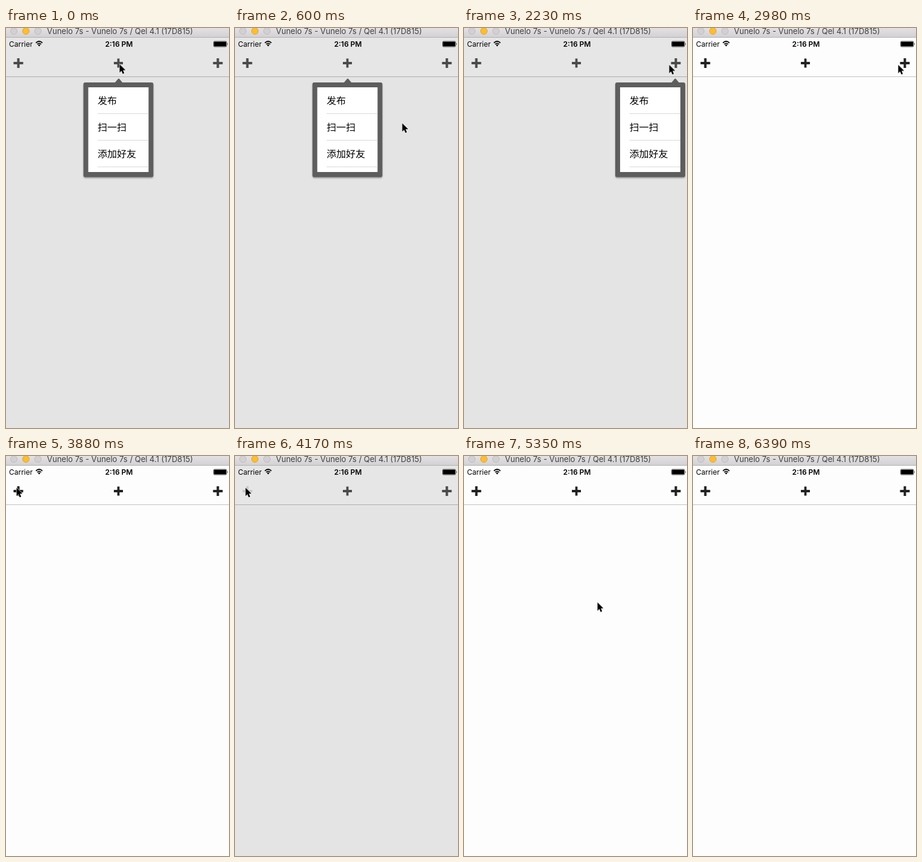
Animation of 370x661 px, one loop 6.99 s. Source, as an HTML page:

```html
<!DOCTYPE html>
<html lang="zh-Hans">
<head>
<meta charset="utf-8">
<title>Popover menu</title>
<style>
html, body { margin: 0; width: 100%; height: 100%; overflow: hidden; background: #fdfdfd; }
svg { display: block; width: 370px; height: 661px; }
text { font-family: Inter, Roboto, sans-serif; }
.menu text { font: 17px "Noto Sans CJK SC", "Noto Sans CJK", sans-serif; }
.anim, .plus { animation: 6990ms step-end infinite; }

.screen { animation-name: dim; }
.plus { animation-name: fade; }
.press-left { animation-name: press-left; }
.press-right { animation-name: press-right; }
.mid { animation-name: show-mid; }
.right { animation-name: show-right; }
.left { animation-name: show-left; }
.cursor { animation-name: move; }

@keyframes dim {
  0%, 25.6%, 59.65% { fill: #e4e4e4; }
  12.73%, 42.63%, 76.53%, 100% { fill: #fdfdfd; }
}
@keyframes fade {
  0%, 25.6%, 59.65% { fill: #4b4b4b; }
  12.73%, 42.63%, 76.53%, 100% { fill: #222; }
}
@keyframes press-left {
  0%, 65.95%, 100% { opacity: 1; }
  59.65% { opacity: .2; }
  61.65% { opacity: .5; }
  63.8% { opacity: .85; }
}
@keyframes press-right {
  0%, 31.9%, 100% { opacity: 1; }
  25.6% { opacity: .2; }
  27.75% { opacity: .5; }
  29.75% { opacity: .85; }
}
@keyframes show-mid {
  0% { opacity: 1; }
  12.73%, 100% { opacity: 0; }
}
@keyframes show-right {
  0%, 42.63%, 100% { opacity: 0; }
  27.75% { opacity: 1; }
}
@keyframes show-left {
  0%, 76.53%, 100% { opacity: 0; }
  61.65% { opacity: 1; }
}
@keyframes move {
  0% { transform: translate(188px, 59.5px); opacity: 1; }
  2.14% { transform: translate(203px, 76px); }
  4.29% { transform: translate(237px, 114px); }
  6.43% { transform: translate(267px, 147px); }
  8.58% { transform: translate(277px, 157px); }
  14.87% { transform: translate(285px, 144px); }
  17.02% { transform: translate(309px, 107px); }
  19.16% { transform: translate(332px, 72px); }
  21.31% { transform: translate(340px, 60.5px); }
  44.77% { transform: translate(248px, 112px); }
  46.92% { transform: translate(130px, 169px); }
  51.21% { transform: translate(84px, 121px); }
  53.36% { transform: translate(34px, 70px); }
  55.5% { transform: translate(17px, 52px); }
  65.95% { transform: translate(48px, 81px); }
  68.09% { transform: translate(125px, 152px); }
  70.1% { transform: translate(196px, 219px); }
  72.24% { transform: translate(221px, 241.5px); }
  80.68% { transform: translate(251px, 330px); }
  82.83% { transform: translate(307px, 493px); }
  84.97% { transform: translate(332px, 567px); }
  89.26% { transform: translate(347px, 633px); opacity: 1; }
  91.41%, 100% { transform: translate(347px, 633px); opacity: 0; }
}
</style>
</head>
<body>
<svg viewBox="0 0 370 661">
  <defs>
    <linearGradient id="bar" x2="0" y2="1">
      <stop stop-color="#e3e1e3"/>
      <stop offset="1" stop-color="#d2d0d2"/>
    </linearGradient>
    <filter id="shadow" x="-10%" y="-10%" width="120%" height="120%">
      <feDropShadow dx="0" dy="1.5" stdDeviation="1.2" flood-opacity=".35"/>
    </filter>
    <path id="plus" d="M-2-8H2V-2H8V2H2V8H-2V2H-8V-2H-2Z"/>
    <g id="box" filter="url(#shadow)">
      <rect y="90" width="116" height="156.5" rx="3" fill="#5d5d5d"/>
      <rect x="8" y="98" width="100" height="140" fill="#fff"/>
    </g>
    <g id="items">
      <path d="M23.5 141.5H108M23.5 185.5H108M23.5 229.5H108" stroke="#d9d9db"/>
      <text x="23.5" y="126">发布</text>
      <text x="23.5" y="170">扫一扫</text>
      <text x="23.5" y="214">添加好友</text>
    </g>
    <path id="tip" d="M-6.5 90.5L-1 84Q0 82.8 1 84L6.5 90.5Z" fill="#5d5d5d"/>
  </defs>

  <rect class="anim screen" y="15" width="370" height="646"/>
  <rect y="16" width="370" height="64" fill="#fff" opacity=".08"/>
  <path d="M0 80.5H370" stroke="#000" stroke-opacity=".24"/>

  <!-- window title -->
  <rect width="370" height="16" fill="url(#bar)"/>
  <path d="M0 15.5H370" stroke="#b3b1b3"/>
  <g fill="#d2d0d2" stroke="#bebcbe">
    <circle cx="13" cy="5" r="5.5"/>
    <circle cx="33" cy="5" r="5.5" fill="#fdbd2f" stroke="#e3a532"/>
    <circle cx="53" cy="5" r="5.5"/>
  </g>
  <text x="68" y="10" font-size="13" fill="#3f3f3f">Vunelo 7s - Vunelo 7s / Qel 4.1 (17D815)</text>

  <!-- status bar -->
  <text x="5" y="31" font-size="12">Carrier</text>
  <g fill="none" stroke="#000" stroke-width="1.7">
    <path d="M49.6 24.6Q55 19.4 60.4 24.6M51.7 27Q55 23.8 58.3 27"/>
    <path d="M53 28.2Q55 26.4 57 28.2L55 30.4Z" fill="#000" stroke="none"/>
  </g>
  <text x="187.5" y="31" font-size="12" font-weight="600" text-anchor="middle">2:16 PM</text>
  <rect x="344.5" y="22" width="21.5" height="9" rx="1.6" fill="none" stroke="#000" stroke-width=".7"/>
  <rect x="345.2" y="22.7" width="20.1" height="7.6" rx=".8"/>
  <path d="M367 24.8Q368.6 26.5 367 28.2Z"/>

  <!-- buttons -->
  <g class="anim press-left"><use class="plus" href="#plus" x="20.5" y="58"/></g>
  <use class="plus" href="#plus" transform="translate(186.5 58) scale(.94)"/>
  <g class="anim press-right"><use class="plus" href="#plus" x="351.5" y="58"/></g>

  <!-- popovers -->
  <g class="menu" id="menus">
    <g class="anim mid"><g transform="translate(128.5)">
      <use href="#box"/><use href="#items"/><use href="#tip" x="58.5"/>
    </g></g>
    <g class="anim right"><g transform="translate(251)">
      <use href="#box"/><use href="#items"/><use href="#tip" x="99.5"/>
    </g></g>
    <g class="anim left"><g transform="translate(6)">
      <use href="#box"/><use href="#items"/><use href="#tip" x="16"/>
    </g></g>
  </g>

  <g class="anim cursor">
    <path d="M.5.5V14.2L3.6 11.3L5.7 16.3L8.2 15.2L6.1 10.3H10.4Z" stroke="#fff" stroke-width="1.1" paint-order="stroke"/>
  </g>
</svg>
<script>
// Shared start so every track stays in phase
document.getAnimations().forEach(a => { a.startTime = 0; a.currentTime = 0; });
</script>
</body>
</html>
```
